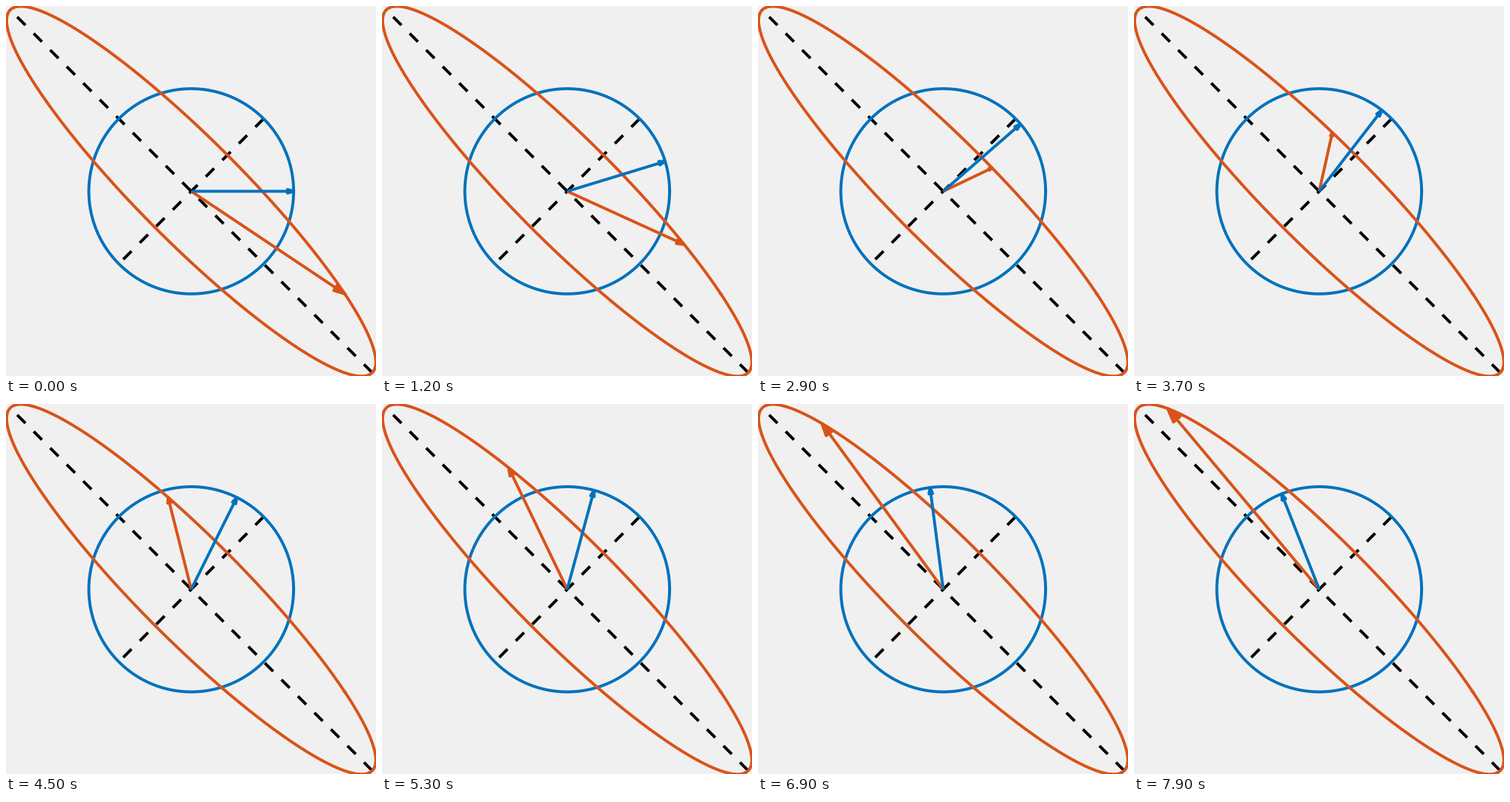
Write a matplotlib script that moves like this. It is 507 px wide and 506 px high and loops after 8000 ms.

```python
import numpy as np
import matplotlib.pyplot as plt
from matplotlib.animation import FuncAnimation
from matplotlib.patches import Polygon

W, H, DPI = 507, 506, 64
FRAMES, INTERVAL = 80, 100
STEP = 2 * np.pi / 255
CENTER = np.array([253.8, 253.4])
UNIT = 140.3
BLUE, ORANGE, PAPER = "#0072BD", "#D95319", "#F0F0F0"
LW = 4 * 72 / DPI
MATRIX = np.array([[1.5, -1.0], [-1.0, 1.5]])


def to_px(p):
    """Map math coordinates (y up) to stage pixels (y down)."""
    return CENTER + UNIT * np.asarray(p) * [1, -1]


def unit(a):
    return np.array([np.cos(a), np.sin(a)])


fig = plt.figure(figsize=(W / DPI, H / DPI), dpi=DPI, facecolor=PAPER)
ax = fig.add_axes([0, 0, 1, 1])
ax.set_xlim(0, W)
ax.set_ylim(H, 0)
ax.axis("off")


def stroke(points, color, z, **kw):
    x, y = to_px(points).T
    return ax.plot(x, y, color=color, lw=LW, zorder=z, snap=False, **kw)[0]


class Arrow:
    """Arrow from the centre whose head scales with its length."""

    def __init__(self, color, z):
        self.shaft = stroke(np.zeros((2, 2)), color, z,
                            solid_capstyle="butt")
        self.head = Polygon(np.zeros((3, 2)), fc=color, ec=color, lw=LW,
                            joinstyle="round", zorder=z, snap=False)
        ax.add_patch(self.head)

    def point_to(self, v):
        side = np.array([-v[1], v[0]]) * 0.018
        base = v * 0.94
        self.shaft.set_data(*to_px([[0, 0], base]).T)
        self.head.set_xy(to_px([v, base + side, base - side]))


# Eigenvector axes
diag = np.sqrt(0.5)
for end in (np.array([2.5, -2.5]) * diag, np.array([1, 1]) * diag):
    stroke([end, -end], "black", 1, linestyle=(0, (4, 4)),
           dash_capstyle="butt")

# Unit circle and its image under the matrix
ring = unit(np.linspace(0, 2 * np.pi, 721)).T
stroke(ring, BLUE, 2)
stroke(ring @ MATRIX.T, ORANGE, 3)

image_arrow = Arrow(ORANGE, 4)
unit_arrow = Arrow(BLUE, 5)


def update(i):
    v = unit(i * STEP)
    unit_arrow.point_to(v)
    image_arrow.point_to(MATRIX @ v)
    return (image_arrow.shaft, image_arrow.head,
            unit_arrow.shaft, unit_arrow.head)


anim = FuncAnimation(fig, update, frames=FRAMES, interval=INTERVAL,
                     repeat=True, repeat_delay=0)
plt.show()
```
